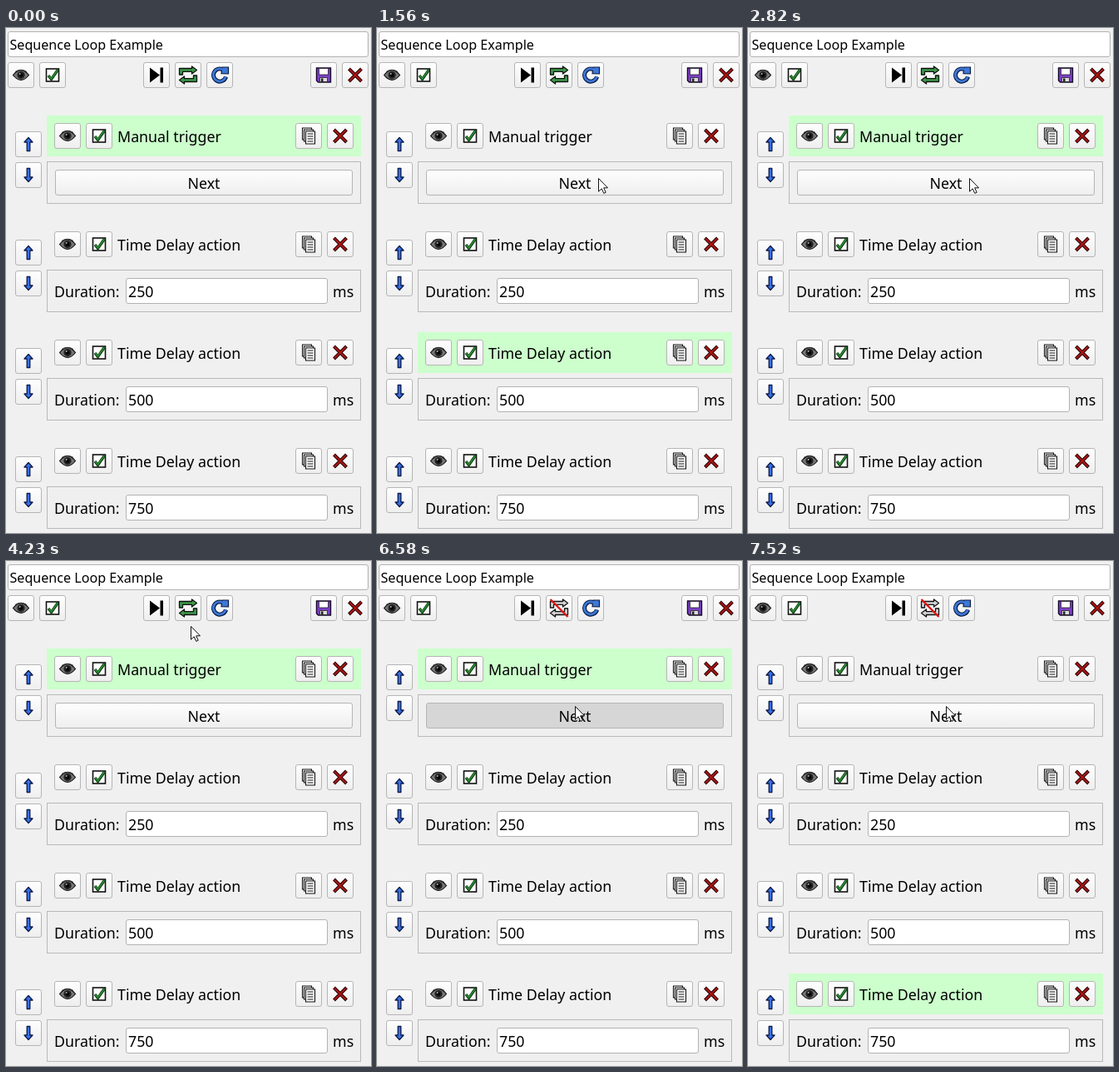
Write an HTML page that moves like this. It is 439 by 606 pixels and loops after 8000 ms.

```html
<!DOCTYPE html>
<html lang="en">
<head>
<meta charset="utf-8">
<title>Sequence loop</title>
<style>
html, body { margin: 0; width: 100%; height: 100%; overflow: hidden; background: #f0f0f0; }
svg { display: block; width: 439px; height: 606px; }
text { font: 17.8px "Noto Sans", "Open Sans", sans-serif; fill: #000; }
</style>
</head>
<body>
<svg id="stage" viewBox="0 0 439 606" xmlns="http://www.w3.org/2000/svg">
  <defs>
    <linearGradient id="face" x2="0" y2="1">
      <stop offset="0" stop-color="#fefefe"/><stop offset="1" stop-color="#eeeeee"/>
    </linearGradient>
    <g id="eye">
      <path d="M-9.5 0Q-5-5.8 0-5.8T9.5 0Q5 5.8 0 5.8T-9.5 0Z" fill="#777" stroke="#111" stroke-width="1.2"/>
      <path d="M-7-4Q0-8.5 7-4" fill="none" stroke="#333"/>
      <circle r="4.6" fill="#222"/>
      <circle r="2.2"/>
      <circle cx="-1.3" cy="-1.6" r="1" fill="#aaa"/>
    </g>
    <g id="check">
      <rect x="-7.5" y="-7.5" width="15" height="15" fill="#fff" stroke="#111" stroke-width="1.6"/>
      <path d="M-5 .5L-1.5 5L6.5-6.5" fill="none" stroke="#0b3d0f" stroke-width="3.4"/>
      <path d="M-4.6 .8L-1.5 4.4L6.2-6.3" fill="none" stroke="#2c8a34" stroke-width="1.7"/>
    </g>
    <g id="skip"><path d="M-8-9L4 0L-8 9ZM4.500-9H8V9H4.500Z"/></g>
    <path id="loopArrows" d="M-10.500-.5V-8H4.500V-10.500L10.500-6L4.500-1.500V-4.200H-6.500V-.5ZM10.500 .5V8H-4.500V10.500L-10.500 6L-4.500 1.500V4.200H6.500V.5Z" stroke="#111" stroke-width="1.3" stroke-linejoin="round"/>
    <g id="loop"><use href="#loopArrows" fill="#3c9a48"/></g>
    <g id="noLoop">
      <use href="#loopArrows" fill="#d4d4d4"/>
      <path d="M-10.500-10.500L10.500 10.500" stroke="#e01414" stroke-width="2.4"/>
    </g>
    <g id="reload">
      <path d="M4.500-6.200A7.600 7.600 0 1 0 7.500 2" fill="none" stroke="#0b1c40" stroke-width="5"/>
      <path d="M3-9.500H10.500V-1.500L2-1.800Z" fill="#3d78d8" stroke="#0b1c40" stroke-width="1.2"/>
      <path d="M4.500-6.200A7.600 7.600 0 1 0 7.400 1.600" fill="none" stroke="#3d78d8" stroke-width="2.800"/>
    </g>
    <g id="save">
      <path d="M-8.500-8.500H8.500V8.500H-6.500L-8.500 6.500Z" fill="#7d3fc8" stroke="#160a2a" stroke-width="1.4"/>
      <path d="M-5.500-8H5.500V-.5H-5.500Z" fill="#fff" stroke="#222" stroke-width=".8"/>
      <path d="M-4.500 3H4.500V8H-4.500Z" fill="#ddd" stroke="#222" stroke-width=".8"/>
      <path d="M-3 4H-.5V8H-3Z" fill="#222"/>
    </g>
    <g id="cross" fill="none">
      <path d="M-7.500-7.500L7.500 7.500M7.500-7.500L-7.500 7.500" stroke="#240404" stroke-width="4"/>
      <path d="M-7-7L7 7M7-7L-7 7" stroke="#a81414" stroke-width="2.200"/>
    </g>
    <g id="copy" fill="#fff" stroke="#111" stroke-width="1.1">
      <path d="M-7.500-9.500H3.500V4.500H-7.500Z"/>
      <path d="M-5.500-7.500H5.500V6.500H-5.500Z"/>
      <path d="M-3.500-5.500H7.500V9.500H-3.500Z"/>
      <path d="M-1.500-2.500H5.500M-1.500 .5H5.500M-1.500 3.500H5.500M-1.500 6.500H5.500"/>
    </g>
    <path id="up" d="M0-8L5-2.500H1.800V8H-1.800V-2.500H-5Z" fill="#3a70e4" stroke="#0c1c4a" stroke-width="1.3" stroke-linejoin="round"/>
    <g id="down"><use href="#up" transform="scale(1 -1)"/></g>
  </defs>
  <rect width="439" height="606" fill="#f0f0f0"/>
  <g id="ui"></g>
  <path id="cursor" d="M.5 .5V16.200L4.200 12.800L6.800 18.400L9.200 17.300L6.700 11.800H11.500Z" fill="#fff" stroke="#111" stroke-width="1"/>
</svg>
<script>
const NS = 'http://www.w3.org/2000/svg';
const ui = document.getElementById('ui');
const cursor = document.getElementById('cursor');
const LOOP = 8000, TICK = 70, ROW = 130;

function add(tag, attrs, text) {
  const el = document.createElementNS(NS, tag);
  for (const key in attrs) el.setAttribute(key, attrs[key]);
  if (text) el.textContent = text;
  return ui.appendChild(el);
}

const box = (x, y, w, h, fill, stroke, rx = 0) =>
  add('rect', { x: x + .5, y: y + .5, width: w - 1, height: h - 1, rx, fill, stroke });
const label = (x, y, text, attrs = {}) => add('text', { x, y, ...attrs }, text);
const button = (x, y, w = 32) => box(x, y, w, 31, 'url(#face)', '#b5b5b5', 2.5);
const field = (x, y, w) => box(x, y, w, 31, '#fff', '#b2b2b2', 2.5);

function iconButton(x, y, icon) {
  const face = button(x, y);
  const mark = add('use', { href: '#' + icon, x: x + 16, y: y + 15.5 });
  return { face, mark };
}

field(2, 4, 434);
label(4.5, 26, 'Sequence Loop Example', { style: 'font-size:16.1px' });

const tools = { eye: 2, check: 40, skip: 165, loop: 203, reload: 241, save: 366, cross: 404 };
const bar = {};
for (const icon in tools) bar[icon] = iconButton(tools[icon], 41, icon);

let next;
const heads = ['Manual trigger', 250, 500, 750].map((step, i) => {
  const y = 105 + i * ROW;
  const head = add('rect', { x: 49, y, width: 378, height: 49, fill: '#ccffcc' });
  iconButton(11, y + 19, 'up');
  iconButton(11, y + 56, 'down');
  iconButton(58, y + 9, 'eye');
  iconButton(96, y + 9, 'check');
  iconButton(348, y + 9, 'copy');
  iconButton(386, y + 9, 'cross');
  label(134, y + 31.5, i ? 'Time Delay action' : step);
  box(49, y + 55, 378, 51, '#efefef', '#b9b9b9');
  if (i) {
    label(58, y + 87.5, 'Duration:');
    field(144, y + 65, 243);
    label(147, y + 87.5, String(step));
    label(393, y + 87.5, 'ms');
  } else {
    next = button(59, y + 65, 358);
    label(238, y + 87.5, 'Next', { 'text-anchor': 'middle' });
  }
  return head;
});

// Pointer strokes: start, number of ticks, then from / control / to
const strokes = [
  { at: 70, ticks: 9, path: [[403, 161], [320, 186], [266, 177]] },
  { at: 960, ticks: 1, path: [[266, 177], [266, 178], [266, 180]] },
  { at: 3740, ticks: 10, path: [[266, 180], [240, 125], [217, 66]] },
  { at: 5690, ticks: 10, path: [[217, 66], [181, 110], [238, 174]] }
];
// Time at which each row becomes the active one
const activations = [[0, 0], [1360, 1], [1560, 2], [2090, 3], [2820, 0], [6790, 1], [6990, 2], [7520, 3]];

const ease = p => p * p * (3 - 2 * p);
const within = (t, a, b) => t >= a && t < b;

function pointerAt(t) {
  const s = strokes.filter(k => t >= k.at).pop();
  if (!s) return null;
  const tick = Math.floor((t - s.at) / TICK) + 1;
  const p = ease(Math.min(1, tick / s.ticks)), q = 1 - p;
  const [a, b, c] = s.path;
  return [0, 1].map(n => Math.round(q * q * a[n] + 2 * p * q * b[n] + p * p * c[n]));
}

function press(face, down) {
  face.setAttribute('fill', down ? '#d6d6d6' : 'url(#face)');
}

function render(t) {
  const active = activations.filter(a => t >= a[0]).pop()[1];
  heads.forEach((head, i) => head.setAttribute('visibility', i === active ? 'visible' : 'hidden'));

  press(next, within(t, 1220, 1290) || within(t, 6580, 6720));
  press(bar.loop.face, within(t, 5030, 5100));
  bar.loop.mark.setAttribute('href', t < 5100 ? '#loop' : '#noLoop');

  const pos = pointerAt(t);
  cursor.setAttribute('visibility', pos ? 'visible' : 'hidden');
  if (pos) cursor.setAttribute('transform', `translate(${pos})`);
}

const start = performance.now();
function frame(now) {
  render(Math.max(0, now - start) % LOOP);
  requestAnimationFrame(frame);
}
render(0);
requestAnimationFrame(frame);
</script>
</body>
</html>
```
